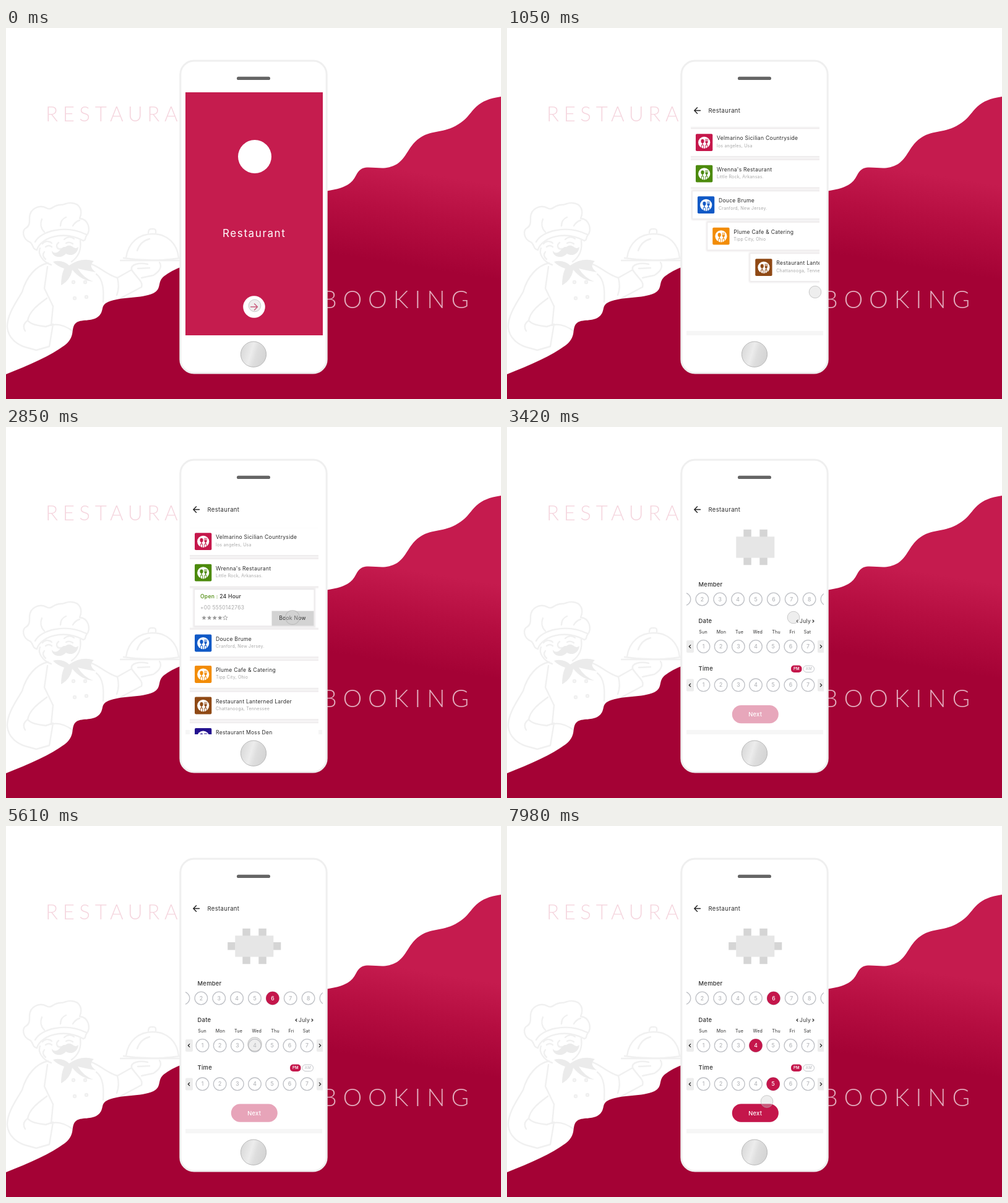
Animation, 800 px wide and 600 px high, one loop 8000 ms. Source, as an HTML page:

```html
<!DOCTYPE html>
<html lang="en">
<head>
<meta charset="utf-8">
<title>Restaurant booking</title>
<style>
html, body { margin: 0; width: 100%; height: 100%; overflow: hidden; background: #fff; }
svg { display: block; width: 800px; height: 600px; }
text { font-family: Inter, "Open Sans", sans-serif; letter-spacing: .03em; fill: #2d2d2d; }
.thin { font-family: Lato, "Open Sans", sans-serif; font-weight: 300; }
.mid { text-anchor: middle; }
.sub { font-size: 7px; fill: #a9a9a9; }
.name { font-size: 8.6px; }
.head { font-size: 9.4px; font-weight: 500; }
.num { font-size: 8.6px; font-weight: 500; fill: #b4b6ba; text-anchor: middle; letter-spacing: 0; }
.line { fill: none; stroke-linecap: round; stroke-linejoin: round; }
</style>
</head>
<body>
<svg viewBox="0 0 800 600" xmlns="http://www.w3.org/2000/svg">
  <defs>
    <linearGradient id="hill" gradientUnits="userSpaceOnUse" x1="658" y1="232" x2="634" y2="382">
      <stop offset="0" stop-color="#c51b4e"/><stop offset=".45" stop-color="#b60e41"/><stop offset="1" stop-color="#a40235"/>
    </linearGradient>
    <linearGradient id="home" x1="0" y1=".35" x2="1" y2=".65">
      <stop offset="0" stop-color="#d9d9d9"/><stop offset=".4" stop-color="#ececec"/>
      <stop offset=".6" stop-color="#dedede"/><stop offset="1" stop-color="#d3d3d3"/>
    </linearGradient>
    <filter id="soft" x="-10%" y="-30%" width="120%" height="160%"><feGaussianBlur stdDeviation="1.2"/></filter>
    <clipPath id="screen"><rect x="290" y="104" width="222" height="393"/></clipPath>
    <clipPath id="cards"><rect x="297" y="150" width="208" height="347"/></clipPath>
    <clipPath id="fold"><rect id="foldBox" x="297" y="258" width="208" height="0"/></clipPath>
  </defs>

  <rect width="800" height="600" fill="#fff"/>
  <g class="line" stroke="#f0f0f0" stroke-width="2.4">
    <path d="M50 359C41 357 45 349 38 346C27 341 25 327 33 323C39 319 38 312 38 306C39 292 54 285 65 291C74 296 76 286 88 286C96 286 97 282 106 283C121 284 124 297 119 308C133 309 138 326 130 336C127 340 130 343 125 344"/>
    <path d="M50 359C55 340 91 326 125 344M47 346C56 329 94 317 130 334M62 330C56 324 55 316 58 309M88 320C88 313 92 308 97 306M108 320C111 315 115 312 119 311"/>
    <path d="M55 356C51 364 58 378 73 383M120 344C122 358 117 370 106 378M59 349C63 344 70 344 74 348M94 342C99 337 106 337 110 341M64 354Q69 350 74 354M97 348Q103 345 108 349M85 347C79 352 83 359 89 357M62 362Q57 368 64 374"/>
    <path d="M68 380C49 384 33 402 26 427C16 444 2 463 2 483C3 502 19 514 38 518L49 521M66 437C54 446 38 457 35 473C42 481 53 481 64 483M35 473Q25 480 31 490M64 483L76 479L70 515L49 521M76 480C88 478 101 485 109 491"/>
    <path d="M133 380C153 386 160 398 180 404L203 391C212 405 222 410 219 419L185 437M146 398C158 407 158 427 157 443M67 386L62 421L76 450L73 481M180 404Q184 419 179 432M203 391C201 382 215 379 229 382M213 389L232 388M219 404L238 400C248 394 253 386 248 379"/>
    <path d="M185 376H282M194 372C197 347 215 333 237 333C261 333 277 349 279 372M190 372Q236 379 282 372M230 331Q230 324 237 325Q243 324 242 331M212 360Q217 345 232 341"/>
    <circle cx="109" cy="411" r="2"/><circle cx="128" cy="411" r="2"/><circle cx="111" cy="437" r="2"/><circle cx="130" cy="435" r="2"/>
  </g>
  <path fill="#ebebeb" d="M96 354C89 353 88 361 82 363Q77 365 74 360C74 371 89 374 97 365C105 370 116 366 117 354Q113 358 108 354Q102 349 96 354ZM76 378Q91 374 102 384Q122 370 142 377Q132 385 145 395Q128 392 116 389Q126 405 141 410Q122 409 107 391Q104 408 89 416Q89 400 94 389Q82 385 76 378Z"/>
  <path fill="url(#hill)" d="M0 560C38 545 72 530 95 513C113 499 104 487 112 478C121 469 139 477 151 465C159 456 152 449 165 443C186 434 219 438 238 429C253 421 243 411 256 401Q268 392 284 386L515 264C538 261 555 256 563 243C569 233 571 225.500 586 225.500C604 225.500 614 230 632 220C651 207 650 186 677 173C696 165 716 169 739 150C756 136 757 117 800 111V600H0Z"/>
  <text class="thin" x="64" y="151" font-size="33" style="letter-spacing:7.6px;fill:#f5d5de">RESTAURANT</text>
  <text class="thin" x="510" y="453" font-size="39" style="letter-spacing:9.8px;fill:#e3adbe">BOOKING</text>

  <rect x="281.800" y="53" width="236.400" height="505" rx="22" fill="#fff" stroke="#efefef" stroke-width="3"/>
  <rect x="373" y="78.700" width="54" height="5.300" rx="2.600" fill="#656565"/>
  <circle cx="400" cy="527.700" r="20.600" fill="url(#home)" stroke="#b9b9b9"/>

  <g clip-path="url(#screen)">
    <g id="splash">
      <rect x="290" y="104" width="222" height="393" fill="#c51c4e"/>
      <circle cx="402" cy="208" r="27" fill="#fff"/>
      <text x="350" y="338" font-size="17" style="letter-spacing:1.6px;fill:#fff">Restaurant</text>
      <circle cx="401" cy="451.500" r="18" fill="#a4123c" opacity=".2"/>
      <circle id="bloom" cx="401" cy="451" r="17.800" fill="#fff"/>
      <path id="go" class="line" stroke="#c51c4e" stroke-width="1.400" d="M395.500 451H406.500M401.500 446L406.500 451L401.500 456"/>
    </g>
    <g id="top">
      <rect x="290" y="490" width="221" height="7" fill="#f6f6f6"/>
      <path class="line" stroke="#222" stroke-width="1.400" d="M312.500 133.500H303M307.500 128.800L302.800 133.500L307.500 138.200"/>
      <text x="325.500" y="136.800" font-size="9.500" style="letter-spacing:.35px">Restaurant</text>
    </g>
    <g id="list" clip-path="url(#cards)"></g>
    <g id="book"></g>
    <circle id="cursor" r="9.800" fill="#cfcfcf" fill-opacity=".36" stroke="#b0b0b0" stroke-opacity=".65"/>
  </g>
</svg>
<script>
const $ = id => document.getElementById(id);
const RED = '#c4164b', LOOP = 8000, FOLD = 63.3;
const clamp = u => Math.max(0, Math.min(1, u));
const span = (t, a, b) => clamp((t - a) / (b - a));
const inOut = u => u < .5 ? 4 * u ** 3 : 1 - (2 - 2 * u) ** 3 / 2;
const out = u => 1 - (1 - u) ** 3;
const label = (x, y, s, cls, more = '') => `<text x="${x}" y="${y}" class="${cls}" ${more}>${s}</text>`;
const box = (x, y, w, h, fill, more = '') => `<rect x="${x}" y="${y}" width="${w}" height="${h}" fill="${fill}" ${more}/>`;
const chevron = (x, y, d, s = 2.4) =>
  `<path class="line" stroke="#222" stroke-width="1.2" d="M${x - d * s / 2} ${y - s}L${x + d * s / 2} ${y}L${x - d * s / 2} ${y + s}"/>`;

// list page
const places = [
  ['Velmarino Sicilian Countryside', 'los angeles, Usa', '#c5174b'],
  ["Wrenna's Restaurant", 'Little Rock, Arkansas.', '#4c8a0c'],
  ['Douce Brume', 'Cranford, New Jersey.', '#1059c6'],
  ['Plume Cafe &amp; Catering', 'Tipp City, Ohio', '#f28c07'],
  ['Restaurant Lanterned Larder', 'Chattanooga, Tennessee', '#8f4915'],
  ['Restaurant Moss Den', 'Park City, Utah', '#23118f'],
  ['Thistledown Pantry', 'Sacramento, California', '#343436']
];
const icon = c => `${box(305, 0, 27.3, 27.8, c, 'rx="1.8"')}
  <circle cx="318.700" cy="14" r="9.600" fill="#fff"/>
  <g fill="${c}"><ellipse cx="316" cy="11.800" rx="2.600" ry="3.300"/><path d="M315.400 14h1.200v4h-1.200zM320.500 8h.8v4h.9V8h.8v4h.9V8h.8v5q0 2-1.500 2.300V18h-1.300v-2.700Q320.500 15 320.500 13z"/></g>
  <path fill="none" stroke="${c}" stroke-width=".9" d="M314.300 24V18H317.700V24M320.800 24V18H324V22"/>`;
const card = ([name, town, c]) => `<g class="card">
  ${box(294.5, -10.7, 220, 49.2, '#eeebec', 'rx="3" filter="url(#soft)"')}${box(297, -8, 220, 43.7, '#fff')}
  ${icon(c)}${label(339, 10, name, 'name')}${label(339, 21.3, town, 'sub')}</g>`;
const star = (x, y, full) => {
  const pts = Array.from({ length: 10 }, (_, i) => {
    const r = i % 2 ? 1.7 : 4, a = i * Math.PI / 5;
    return `${(x + r * Math.sin(a)).toFixed(2)},${(y - r * Math.cos(a)).toFixed(2)}`;
  });
  return `<polygon points="${pts.join(' ')}" fill="${full ? '#999' : 'none'}" stroke="#999" stroke-width="${full ? 0 : .8}"/>`;
};
const panel = `<g clip-path="url(#fold)"><g id="panel">
  ${box(302.5, 260, 197.5, 64.500, '#eceaeb', 'filter="url(#soft)"')}${box(305, 263.3, 192.5, 57.9, '#fff')}
  ${label(314, 277.3, '<tspan style="fill:#4c8a0c">Open :</tspan> 24 Hour', 'name', 'font-weight="500"')}
  ${label(314, 295.4, '+00 5550142763', 'sub', 'style="font-size:8.400px"')}
  ${[0, 1, 2, 3, 4].map(i => star(320 + i * 8.6, 308.7, i < 4)).join('')}
  ${box(429.5, 297.5, 68, 24, '#d3d3d3')}${label(463, 312.3, 'Book Now', 'name mid')}
  </g></g>`;
$('list').innerHTML = places.map(card).join('') + panel + box(290, 150, 222, 13.5, '#fff', 'id="veil"');
const cards = [...document.querySelectorAll('.card')];

// booking page
const dayX = i => 317.5 + 28.17 * i;
const memberX = i => 286.5 + 28.87 * i;
const ring = (x, y, n) => `<circle cx="${x}" cy="${y}" r="10.3" fill="#fff" stroke="#bfc1c6" stroke-width="1.3"/>${label(x, y + 3.1, n, 'num')}`;
const row = (count, xAt, y) => Array.from({ length: count }, (_, i) => ring(xAt(i), y, i + 1)).join('');
const pick = (id, x, y, n) => `<g id="${id}"><circle cx="${x}" cy="${y}" r="10.7" fill="${RED}"/>${label(x, y + 3.1, n, 'num', 'style="fill:#fff"')}</g>`;
const arrows = y => box(290, y - 10, 12, 20, '#ededed', 'rx="2"') + box(502, y - 10, 12, 20, '#ededed', 'rx="2"') +
  chevron(295.5, y, -1) + chevron(507.5, y, 1);
const seat = (x, y, id = '') => box(x, y, 12.5, 12.5, '#d5d5d5', id && `id="${id}"`);
const dayNames = [['Sun', 317], ['Mon', 346.5], ['Tue', 375.5], ['Wed', 405.3], ['Thu', 435], ['Fri', 461], ['Sat', 485.5]];
const parts = [
  seat(382.3, 165.8) + seat(408.3, 165.8) + seat(382.3, 210.7) + seat(408.3, 210.7) +
    seat(358.2, 188, 'seatL') + seat(431.8, 188, 'seatR') + box(370.3, 177.3, 62, 34.3, '#e6e6e6'),
  label(309.5, 257.5, 'Member', 'head') + row(9, memberX, 278.5) + pick('six', memberX(5), 278.5, 6),
  label(309.5, 317.3, 'Date', 'head') + label(482, 317, 'July', 'name mid') + chevron(469, 314, -1, 1.9) + chevron(495, 314, 1, 1.9) +
    dayNames.map(([d, x]) => label(x, 334.4, d, 'mid', 'font-size="7.1"')).join('') +
    arrows(355) + row(7, dayX, 355) + pick('four', dayX(3), 355, 4),
  label(309.5, 393.7, 'Time', 'head') +
    box(459, 385.5, 17.5, 11.5, RED, 'rx="5"') + label(467.8, 393.4, 'PM', 'mid', 'font-size="6" font-weight="600" style="fill:#fff"') +
    box(479, 386, 17.5, 10.5, '#fff', 'rx="5" stroke="#c3c5ca"') + label(487.8, 393.4, 'AM', 'mid', 'font-size="6" style="fill:#b4b6ba"') +
    arrows(417.5) + row(7, dayX, 417.3) + pick('five', dayX(4), 417.3, 5),
  box(363.8, 449.5, 75, 29.3, '#e7a4b9', 'rx="14.6"') + box(363.8, 449.5, 75, 29.3, RED, 'rx="14.6" id="ready"') +
    label(401.2, 467.5, 'Next', 'head mid', 'style="fill:#fff"')
];
$('book').innerHTML = parts.map(p => `<g class="part">${p}</g>`).join('');
const groups = [...document.querySelectorAll('.part')];

const path = [
  [0, 402, 449], [380, 402, 449], [1020, 498, 427], [1130, 498, 427], [1680, 418, 244], [2060, 418, 244],
  [2720, 463, 308], [3720, 463, 308], [4220, 431, 281], [4680, 431, 281], [5400, 402, 353], [5860, 402, 353],
  [6610, 430, 416], [7450, 430, 416], [8000, 420, 445.5]
];
const taps = [[30, 180], [1830, 1950], [2760, 2950], [4290, 4410], [5430, 5700], [6660, 6860]];

const alpha = (el, v) => el.setAttribute('opacity', v.toFixed(3));
const move = (el, x, y) => el.setAttribute('transform', `translate(${x.toFixed(2)} ${y.toFixed(2)})`);

function draw(t) {
  const bloom = inOut(span(t, 330, 700));
  $('splash').style.display = t < 720 ? '' : 'none';
  $('bloom').setAttribute('r', 17.8 + 360 * bloom);
  alpha($('go'), 1 - span(t, 330, 420));
  alpha($('top'), span(t, 520, 680));

  const open = FOLD * inOut(span(t, 1960, 2420));
  cards.forEach((el, i) => {
    const slide = 215 * (1 - out(span(t, 537 + 105 * i, 937 + 105 * i)));
    move(el, slide, 171.3 + 50.5 * i + (i > 1 ? open : 0));
  });
  $('foldBox').setAttribute('height', open ? open + 5 : 0);
  move($('panel'), 0, (open - FOLD) * .3);
  $('veil').style.display = t < 2760 ? 'none' : '';
  const leave = span(t, 2940, 3160);
  alpha($('list'), 1 - leave);
  $('list').style.display = t < 500 || leave === 1 ? 'none' : '';

  $('book').style.display = t < 3050 ? 'none' : '';
  groups.forEach((el, i) => {
    const u = out(span(t, 3060 + 50 * i, 3300 + 50 * i));
    alpha(el, u);
    move(el, 0, 14 * (1 - u));
  });
  const pull = 13 * (1 - out(span(t, 4630, 4900)));
  move($('seatL'), pull, 0);
  move($('seatR'), -pull, 0);
  alpha($('six'), span(t, 4620, 4800));
  alpha($('four'), span(t, 5850, 6030));
  alpha($('five'), span(t, 6860, 7040));
  alpha($('ready'), span(t, 7020, 7380));

  const k = Math.max(1, path.findIndex(p => p[0] > t));
  const [a, x0, y0] = path[k - 1], [b, x1, y1] = path[k];
  const u = inOut(span(t, a, b));
  const tap = taps.find(([s, e]) => t > s && t < e);
  const size = tap ? 1 + .16 * Math.sin(Math.PI * span(t, ...tap)) : 1;
  $('cursor').setAttribute('transform', `translate(${x0 + (x1 - x0) * u} ${y0 + (y1 - y0) * u}) scale(${size})`);
}

const start = performance.now();
function tick() {
  draw((performance.now() - start) % LOOP);
  requestAnimationFrame(tick);
}
tick();
</script>
</body>
</html>
```
